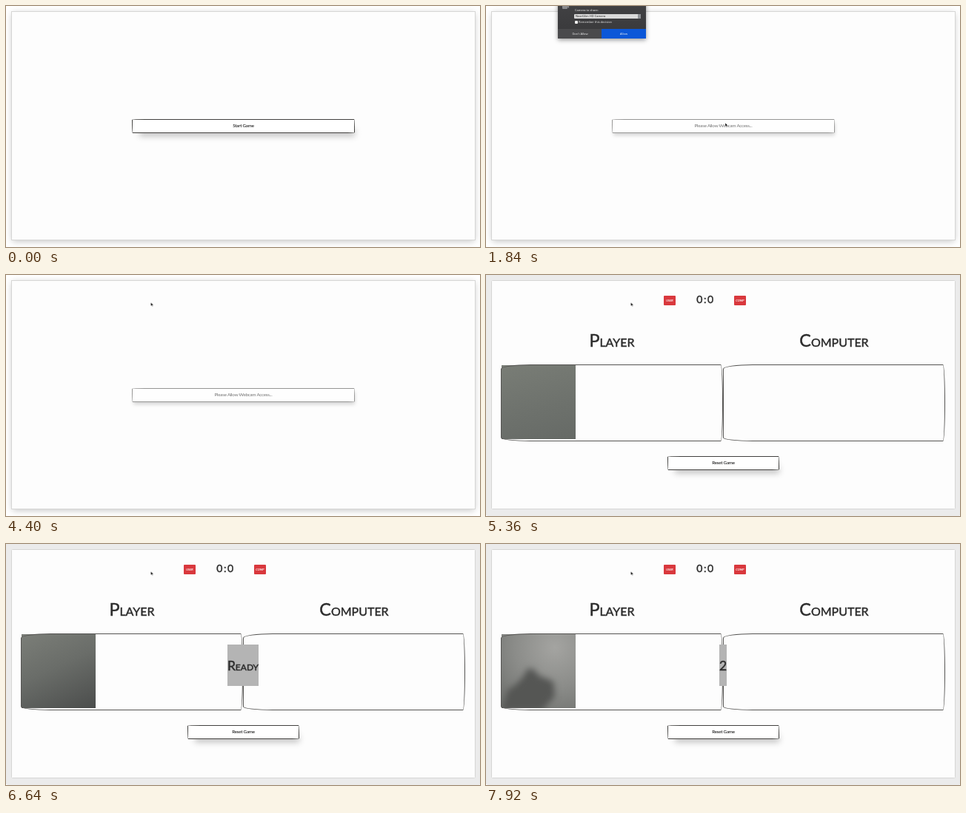
These frames come from a looping animation (640x326 px, 8000 ms). An HTML page:

```html
<!DOCTYPE html>
<html lang="en">
<head>
<meta charset="utf-8">
<title>Hand game</title>
<style>
html, body { margin: 0; width: 100%; height: 100%; overflow: hidden; background: #fff; }
#stage { position: relative; width: 640px; height: 326px; overflow: hidden; font-family: Lato, sans-serif; color: #2c2c2c; }
#stage div, svg { position: absolute; box-sizing: border-box; }
svg { left: 0; top: 0; overflow: visible; }
.scene { inset: 0; }
.pop, .cursor, .dim, .lit, .start { animation: 8s linear infinite; }

.card, .rim { left: 7px; top: 7px; width: 627px; height: 310px; }
.card { background: #fdfdfd; border: 1px solid #d6d6d5;
  box-shadow: -.5px 2px 9px -1px rgba(0,0,0,.25); }
.rim { border-radius: 3px; box-shadow: 0 0 0 10px #ebebeb; }
.btn { background: #fff; border: 1px solid #41403e; text-align: center; color: #000;
  font-size: 6.3px; letter-spacing: -.04em; line-height: 16px;
  border-radius: 127px 7px 112px 7px / 7px 112px 7px 127px;
  box-shadow: 5px 9px 8px -5px rgba(0,0,0,.25); }
.wide { left: 170px; top: 153px; width: 301px; height: 19px; }
.reset { left: 245px; top: 245px; width: 151px; height: 19px; }
.wait { opacity: .55; box-shadow: 1px 4px 5px -1px rgba(0,0,0,.3); }

.panel { top: 121px; width: 300px; height: 104px; border: 1px solid #555452;
  border-radius: 40px 3px 3px 40px / 6px 52px 52px 5px; }
.head, .score, .count { -webkit-text-stroke: .45px; }
.head { top: 73px; width: 300px; text-align: center; font-size: 23.3px; line-height: 30px; font-variant: small-caps; }
.score { left: 271px; top: 23px; width: 51px; text-align: center; font-size: 14px; line-height: 20px; letter-spacing: 1.6px; }
.badge { top: 28px; width: 16px; height: 13px; border-radius: 1px; background: #d9383d; color: #fff;
  text-align: center; font: italic bold 4px/13px Lato, sans-serif; }
.video { left: 21px; top: 122px; width: 100px; height: 100px; overflow: hidden;
  background: linear-gradient(165deg, #797d76, #6d716c 60%, #666a66); }
.video div { inset: 0; }
.dim { background: linear-gradient(155deg, #7b7e78, #6a6d69 45%, #4b4d4c); animation-name: dim; }
.lit { background: radial-gradient(circle at 72% 18%, #a4a4a1, #8b8c89 50%, #686a67 105%); animation-name: lit; }
.hand { fill: #555654; filter: blur(4px); }

.count { left: 0; top: 136px; width: 640px; height: 56px; text-align: center; }
.count span { display: inline-block; height: 56px; background: #b4b4b4; font-size: 17.5px; line-height: 57px; font-variant: small-caps; }

.pop { left: 97px; top: -10px; width: 119px; height: 54px; background: linear-gradient(#434345, #38383a);
  box-shadow: 0 2px 6px rgba(0,0,0,.4); color: #f2f2f2; font: 4px/6px "Open Sans", sans-serif; animation-name: pop; white-space: nowrap; }
.cam { left: 6px; top: 8px; width: 7px; height: 6px; border-radius: 1px; background: #8b8b8d; }
.cam::after { content: ""; position: absolute; left: 6px; top: 1px; border: 2px solid transparent; border-right: 3px solid #8b8b8d; border-left: 0; }
.list { left: 22px; top: 21px; width: 90px; height: 6px; border-radius: 1px; background: #dadada; color: #222; padding-left: 2px; }
.list::after { content: ""; position: absolute; right: 0; top: 0; width: 4px; height: 6px; border-radius: 1px; background: #8f9296; }
.tick { left: 23px; top: 30px; width: 4px; height: 4px; border-radius: 1px; background: #eee; }
.no, .yes { top: 41px; height: 13px; width: 60px; line-height: 13px; text-align: center; }
.no { left: 0; background: #4a4a4c; }
.yes { left: 59px; background: #0b57d8; }
.cursor { animation-name: cursor; }

#s1 { animation: s1 8s step-end infinite; }
#s2 { animation: s2 8s step-end infinite; }
#s3 { animation: s3 8s step-end infinite; }
#ready { animation: ready 8s step-end infinite; }
#three { animation: three 8s step-end infinite; }
#two { animation: two 8s step-end infinite; }
.start { animation-name: hover; }

@keyframes s1 { 0% { opacity: 1 } 18.75%, 100% { opacity: 0 } }
@keyframes s2 { 0% { opacity: 0 } 18.75% { opacity: 1 } 67%, 100% { opacity: 0 } }
@keyframes s3 { 0% { opacity: 0 } 67%, 100% { opacity: 1 } }
@keyframes ready { 0% { opacity: 0 } 72.25% { opacity: 1 } 84.75%, 100% { opacity: 0 } }
@keyframes three { 0% { opacity: 0 } 84.75% { opacity: 1 } 97.25%, 100% { opacity: 0 } }
@keyframes two { 0% { opacity: 0 } 97.25%, 100% { opacity: 1 } }
@keyframes hover {
  0%, 13% { box-shadow: 5px 9px 8px -5px rgba(0,0,0,.25) }
  16%, 100% { box-shadow: 1px 4px 5px -1px rgba(0,0,0,.3) }
}
@keyframes pop { 0%, 18.75% { opacity: 0 } 20.5%, 51% { opacity: 1 } 53%, 100% { opacity: 0 } }
@keyframes dim { 0%, 67% { opacity: 0 } 83%, 100% { opacity: 1 } }
@keyframes lit { 0%, 85% { opacity: 0 } 99%, 100% { opacity: 1 } }
@keyframes cursor {
  0%, 1% { transform: translate(300px, 328px) }
  3% { transform: translate(305px, 302px) }
  6% { transform: translate(313px, 284px) }
  9% { transform: translate(312px, 261px) }
  12% { transform: translate(324px, 187px) }
  14.5%, 26% { transform: translate(323px, 158px) }
  29% { transform: translate(255px, 111px) }
  31% { transform: translate(209px, 62px) }
  32.5% { transform: translate(203px, 52px) }
  35%, 40% { transform: translate(191.5px, 14px) }
  44%, 100% { transform: translate(195.5px, 37px) }
}
</style>
</head>
<body>
<div id="stage">
  <div class="card"></div>
  <div class="scene" id="s1"><div class="btn wide start">Start Game</div></div>
  <div class="scene" id="s2"><div class="btn wide wait">Please Allow Webcam Access...</div></div>
  <div class="scene" id="s3">
    <div class="rim"></div>
    <div class="badge" style="left:240px">USER</div>
    <div class="score">0:0</div>
    <div class="badge" style="left:335px">COMP</div>
    <div class="head" style="left:20px">Player</div>
    <div class="head" style="left:320px">Computer</div>
    <div class="video">
      <div class="dim"></div>
      <div class="lit">
        <svg width="100" height="100"><path class="hand" d="M8 76Q26 66 35 47Q43 44 50 56L70 64 72 84 54 104H0Z"/></svg>
      </div>
    </div>
    <div class="panel" style="left:20px"></div>
    <div class="panel" style="left:320px"></div>
    <div class="btn reset">Reset Game</div>
    <div class="count" id="ready"><span>Ready</span></div>
    <div class="count" id="three"><span>3</span></div>
    <div class="count" id="two"><span>2</span></div>
  </div>
  <div class="pop">
    <div class="cam"></div>
    <div style="left:23px;top:13px">Camera to share:</div>
    <div class="list">NearGlim HD Camera</div>
    <div class="tick"></div>
    <div style="left:28px;top:29px">Remember this decision</div>
    <div class="no">Don't Allow</div>
    <div class="yes">Allow</div>
  </div>
  <svg width="640" height="326">
    <path class="cursor" d="M0 0V5L1.2 4 2 5.8 2.9 5.4 2.1 3.7H3.6Z" fill="#000" stroke="#fff" stroke-width=".5"/>
  </svg>
</div>
</body>
</html>
```
